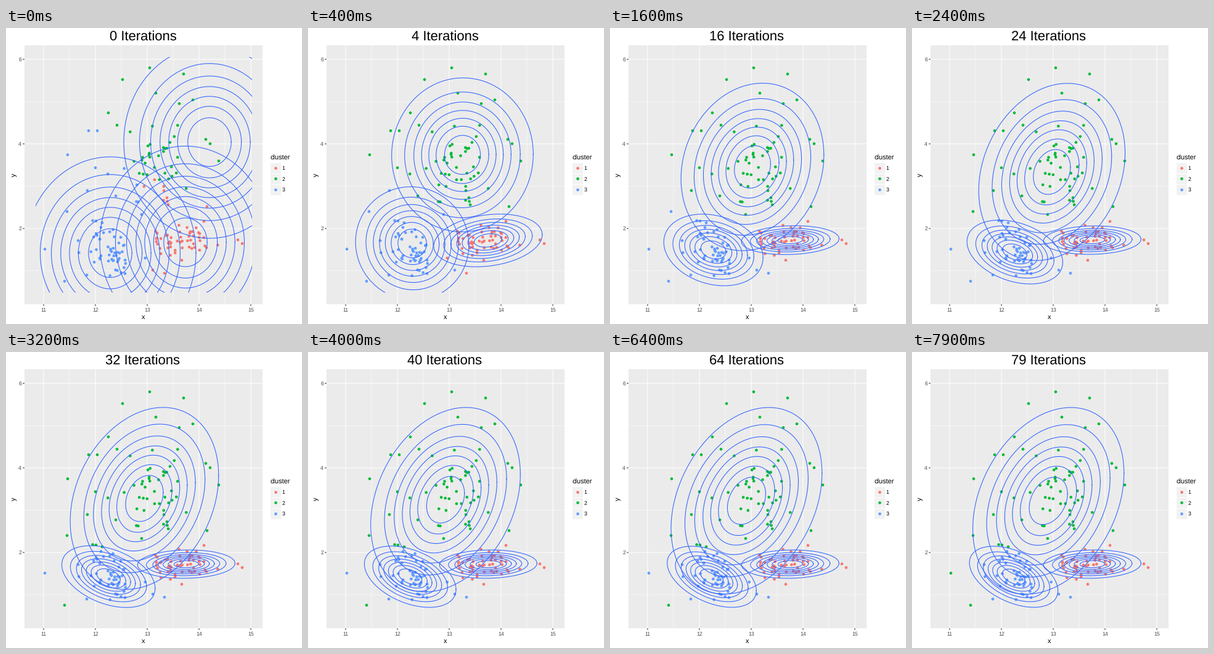
Write a matplotlib script that moves like this. It is 480 px wide and 480 px high and loops after 8000 ms.

```python
import numpy as np
import matplotlib.pyplot as plt
from matplotlib.animation import FuncAnimation
from matplotlib.patches import Rectangle

SIZE, FRAMES, STEP_MS = 480, 80, 100
COLORS = ["#F8766D", "#00BA38", "#619CFF"]
LINE = "#3366FF"
LEVELS = 8

plt.rcParams["font.family"] = ["Liberation Sans", "DejaVu Sans"]
plt.rcParams["text.hinting"] = "none"

# Outermost contour of the red, green and blue component in pixels:
# centre x, centre y, half width, half height, correlation.
START = np.array([[cx, cy, 139, 156, 0]
                  for cx, cy in ((291, 347.5), (330, 185), (169, 365))])
EARLY = np.array([[292, 344, 80, 25, .25],
                  [238, 209, 111, 120, .01],
                  [169, 347, 84.5, 82, -.03]])
FINAL = np.array([[292.3, 344, 79, 23, .06],
                  [221, 241.5, 122.7, 151.5, .3],
                  [164.7, 364.5, 71.2, 49.5, -.46]])

# decay times of the slow phase along x and y, in iterations
TAU_X, TAU_Y = np.array([5, 15, 22]), np.array([5, 11.5, 6])
TAU = np.column_stack([TAU_X, TAU_Y, TAU_X, TAU_Y, (TAU_X + TAU_Y) / 2])
LOG_WEIGHT = np.log([.31, .45, .24])


def fit_at(k):
    """Fast approach to the early fit, then slow decay to the final one."""
    early = EARLY + (START - EARLY) * np.exp(-k / 2)
    return FINAL + (early - FINAL) * np.exp(-max(k - 8, 0) / TAU)


def cluster_of(points, k):
    """Most likely component of every point."""
    scores = []
    for cx, cy, w, h, rho in fit_at(k):
        sx, sy = np.array([w, h]) / np.sqrt(2 * np.log(LEVELS))
        zx, zy = (points[:, 0] - cx) / sx, (cy - points[:, 1]) / sy
        rest = 1 - rho ** 2
        dist = (zx ** 2 + zy ** 2 - 2 * rho * zx * zy) / rest
        scores.append(-dist / 2 - np.log(sx * sy * np.sqrt(rest)))
    bias = LOG_WEIGHT * (1 - np.exp(-k / 2))
    return np.argmax(np.array(scores) + bias[:, None], axis=0)


def cloud(rng, n, mean, sd, rho):
    """Normal scatter without far outliers."""
    z = rng.standard_normal((4 * n, 2))
    z = z[np.hypot(*z.T) < 2.1][:n]
    y = rho * z[:, 0] + np.sqrt(1 - rho ** 2) * z[:, 1]
    return np.column_stack([mean[0] + sd[0] * z[:, 0], mean[1] - sd[1] * y])


OUTLIERS = [
    (233, 65), (189, 84), (288, 75), (243, 106), (303, 117), (281, 123),
    (166, 138), (180, 158), (134, 167), (148, 167), (100, 206), (324, 181),
    (331, 188), (345, 216), (145, 227), (132, 264), (326, 290), (99, 298),
    (95, 411), (63, 359), (383, 350), (376, 344), (321, 314), (285, 377),
    (257, 398), (238, 393), (131, 401)]

rng = np.random.default_rng(12)
points = np.vstack([
    OUTLIERS,
    cloud(rng, 46, (234, 228), (36, 38), .2),
    cloud(rng, 50, (287, 344), (34, 13), .1),
    cloud(rng, 53, (166, 358), (30, 22), -.3)])
points[:, 1] -= .4

fig = plt.figure(figsize=(SIZE / 72, SIZE / 72), dpi=72, facecolor="white")
ax = fig.add_axes([0, 0, 1, 1])
ax.set(xlim=(0, SIZE), ylim=(SIZE, 0))
ax.axis("off")


def box(x, y, w, h, color):
    return ax.add_patch(Rectangle((x, y), w, h, fc=color, ec="none", zorder=1))


def segment(x, y, color, width):
    ax.plot(x, y, color=color, lw=width, solid_capstyle="butt",
            snap=False, zorder=2)


def label(x, y, text, size, color="black", ha="center", **kw):
    return ax.text(x, y, text, size=size, color=color, ha=ha, **kw)


def scatter(x, y, color):
    return ax.scatter(x, y, s=4.6 ** 2, c=color, lw=0, zorder=3)


# panel, grid and axes
left, right, top, bottom = 30, 416, 28, 448
box(left, top, right - left, bottom - top, "#EBEBEB")
for i in range(5):
    x = 61 + 84 * i
    if i < 4:
        segment([x + 42] * 2, [top, bottom], "white", .5)
    segment([x, x], [top, bottom], "white", 1.07)
    segment([x, x], [bottom, bottom + 2.75], "#333333", 1.07)
    label(x, 460, str(11 + i), 8.8, "#4D4D4D")
for i in range(3):
    y = 325.1 - 137.2 * i
    segment([left, right], [y + 68.6] * 2, "white", .5)
    segment([left, right], [y, y], "white", 1.07)
    segment([left - 2.75, left], [y, y], "#333333", 1.07)
    label(25, y + 3, str(2 + 2 * i), 8.8, "#4D4D4D", "right")
label(222.7, 472, "x", 11)
label(14, 238, "y", 11, rotation=90, va="center")

# legend
label(428.7, 214, "cluster", 11, ha="left")
for i, color in enumerate(COLORS):
    y = 219 + 17.3 * i
    box(429, y, 17.3, 17.3, "#F2F2F2")
    if i:
        segment([429, 446.3], [y, y], "white", 1)
    scatter([437.3], [y + 8.1], color)
    label(447.8, y + 11.5, str(i + 1), 8.8, ha="left")

title = label(222, 20.5, "", 22)
dots = scatter(*points.T, COLORS[0])
palette = np.array(COLORS)

view = box(47.5, 47, 351, 382, "none")
curves = [ax.plot([], [], color=LINE, lw=1.07, zorder=4)[0] for _ in FINAL]
for curve in curves:
    curve.set_clip_path(view)

# contours at even fractions of the peak density
radii = np.sqrt(np.log(LEVELS / np.arange(1, LEVELS)) / np.log(LEVELS))
angle = np.append(np.linspace(0, 2 * np.pi, 121), np.nan)
ring_x = np.outer(radii, np.cos(angle)).ravel()
ring_y = np.outer(radii, np.sin(angle)).ravel()


def draw(k):
    title.set_text(f"{k} Iterations")
    dots.set_facecolors(palette[cluster_of(points, k)])
    for curve, (cx, cy, w, h, rho) in zip(curves, fit_at(k)):
        tilt = rho * ring_x + np.sqrt(1 - rho ** 2) * ring_y
        curve.set_data(cx + w * ring_x, cy - h * tilt)
    return [title, dots, *curves]


anim = FuncAnimation(fig, draw, frames=FRAMES, interval=STEP_MS,
                     repeat=True, repeat_delay=0, blit=False)
plt.show()
```
